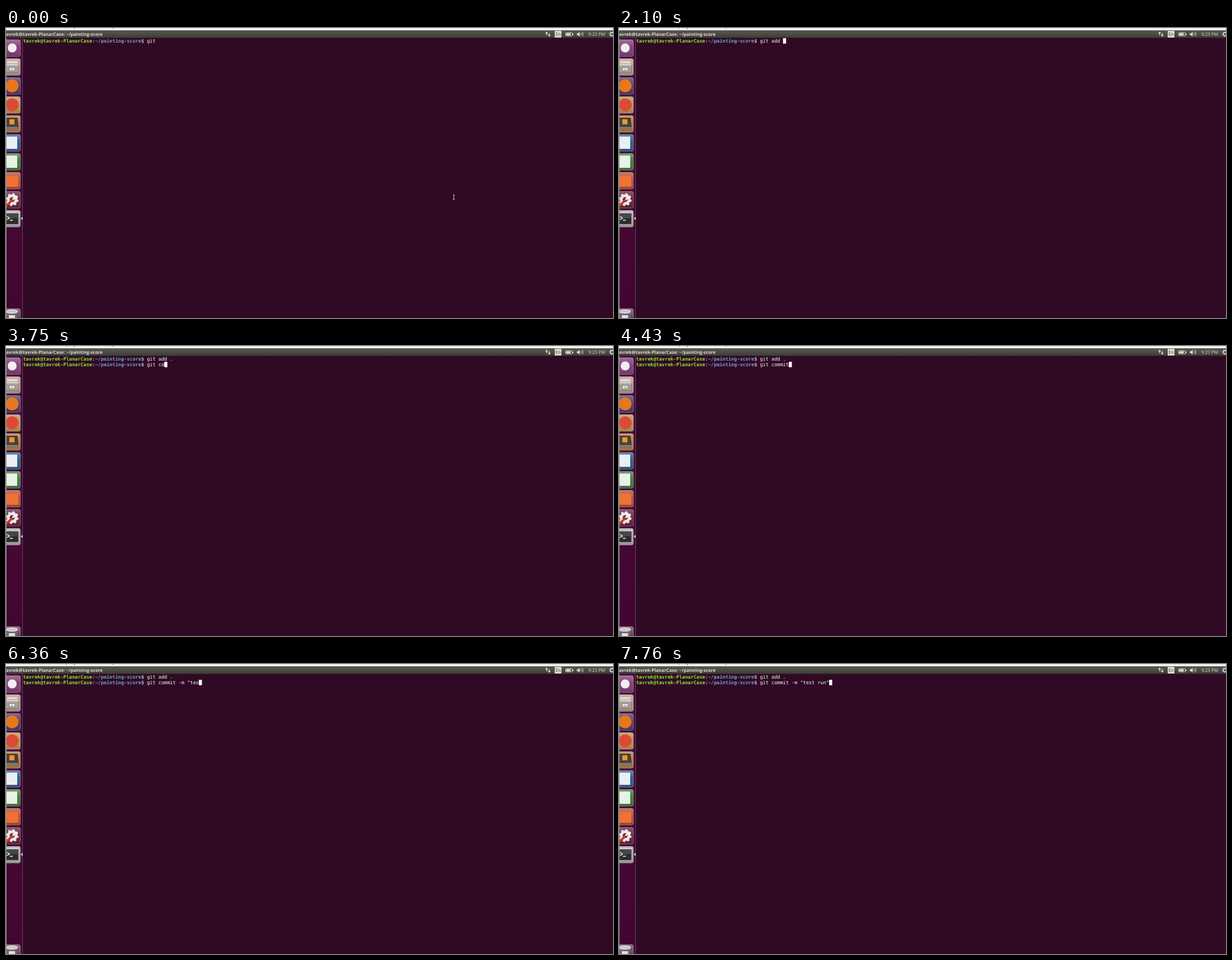
An HTML page that plays this animation: 1083x517 px, repeating every 8000 ms.

```html
<!DOCTYPE html>
<html lang="en">
<head>
<meta charset="utf-8">
<title>Terminal session</title>
<style>
  html, body { margin: 0; width: 100%; height: 100%; overflow: hidden; background: #300a24; }
  svg { display: block; width: 100%; height: 100%; }
  text { white-space: pre; text-rendering: geometricPrecision; }
  .mono { font: 8.54px "DejaVu Sans Mono", monospace; fill: #fff; }
  .panel { font: 8px "Open Sans", "Noto Sans", sans-serif; fill: #dfdbd2; }
  .bold { font-weight: 700; }
</style>
</head>
<body>
<svg id="stage" viewBox="0 0 1083 517" preserveAspectRatio="none">
  <defs>
    <linearGradient id="bar" x2="0" y2="1">
      <stop stop-color="#5b5a51"/><stop offset="1" stop-color="#3d3c37"/>
    </linearGradient>
    <linearGradient id="dock" x2="0" y2="1">
      <stop stop-color="#4a0c3c"/><stop offset="1" stop-color="#41062f"/>
    </linearGradient>
    <linearGradient id="gloss" x2="0" y2="1">
      <stop stop-color="#fff" stop-opacity=".26"/>
      <stop offset=".5" stop-color="#fff" stop-opacity=".02"/>
      <stop offset="1" stop-color="#000" stop-opacity=".16"/>
    </linearGradient>
  </defs>
  <rect width="1083" height="517" fill="#300a24"/>

  <g id="launcher">
    <rect y="17" width="29" height="500" fill="url(#dock)"/>
    <rect x="29" y="17" width="1" height="500" fill="#674060"/>
    <g id="tiles"></g>
    <path d="M29.5 336.5v6l-3-3z" fill="#eee"/>
    <rect y="18" width="1" height="499" fill="#a08a9b"/>
  </g>

  <g id="panel">
    <rect width="1083" height="4" fill="#fff"/>
    <rect width="1083" height="1" fill="#dcdcdc"/>
    <path d="M107 .5h1M121 .5h2M190 .5h1.500" stroke="#444"/>
    <rect y="4" width="1083" height="13.500" fill="url(#bar)"/>
    <text id="title" class="panel bold" x="0" y="13.500"></text>
    <path d="M964.600 13V8M969.300 9v5" stroke="#dfdbd2" stroke-width="1.300"/>
    <path d="M962 9.800l2.600-3.600 2.600 3.600zM966.700 12.200l2.600 3.600 2.600-3.600z" fill="#dfdbd2"/>
    <rect x="979" y="5" width="12" height="12" rx="1" fill="#dfdbd2"/>
    <text class="panel" x="980.500" y="13.800" style="fill:#3c3b37">En</text>
    <rect x="998.500" y="8.500" width="12" height="5.500" rx="1" fill="none" stroke="#dfdbd2"/>
    <path d="M999.500 9.500h8v3.500h-8zM1011 10h1.500v2.500h-1.500z" fill="#dfdbd2"/>
    <path d="M1018.500 9.500h2l3-2.700v8.600l-3-2.700h-2z" fill="#dfdbd2"/>
    <path d="M1025 9.500q1.200 1.500 0 3M1026.700 8q2.300 3 0 6M1028.300 6.700q3.200 4.300 0 8.600"
      fill="none" stroke="#dfdbd2" stroke-width=".8"/>
    <text class="panel" x="1039" y="13.500">9:23 PM</text>
    <circle cx="1081" cy="11" r="2.700" fill="none" stroke="#dfdbd2" stroke-width="1.400"/>
    <circle cx="1081" cy="11" r="4" fill="none" stroke="#dfdbd2" stroke-width="1.400" stroke-dasharray="1.57"/>
  </g>

  <g id="rows"></g>
  <rect id="caret" width="5.500" height="9.600" fill="#fff"/>
  <path id="pointer" d="M797.500 297.500h3M799 297.500v8M797.500 305.500h3" fill="none" stroke="#d8d0d5"/>
</svg>
<script>
const LOOP = 8000, LEFT = 30.4, CELL = 5.1415, ROW = 10;
const USER = 'tavrek', HOST = USER + '-PlanarCase', FOLDER = '~/painting-score';
const PROMPT_COLS = `${USER}@${HOST}:${FOLDER}$ `.length;

const byId = id => document.getElementById(id);
function add(parent, tag, attrs, content = '') {
  const node = document.createElementNS('http://www.w3.org/2000/svg', tag);
  for (const key in attrs) node.setAttribute(key, attrs[key]);
  node.textContent = content;
  parent.appendChild(node);
  return node;
}

// Launcher
const tiles = byId('tiles');
function tile(y, fill, paint) {
  const g = add(tiles, 'g', { transform: `translate(0 ${y})` });
  const box = { x: -4, y: .5, width: 29.5, height: 29.5, rx: 3 };
  add(g, 'rect', { ...box, fill });
  add(g, 'rect', { ...box, fill: 'url(#gloss)', stroke: '#fff', 'stroke-opacity': .35 });
  paint(g);
}
const path = (g, d, fill, stroke = 'none', width = 1) =>
  add(g, 'path', { d, fill, stroke, 'stroke-width': width });
const disc = (r, fill, x = 11) => g => add(g, 'circle', { cx: x, cy: 15, r, fill });
const block = (x, y, width, height, fill) => g => add(g, 'rect', { x, y, width, height, fill });

function drawer(g) {
  path(g, 'M2 5H20L22 13H0z', '#e2ded9');
  path(g, 'M1 9H21', 'none', '#c98a6a');
  path(g, 'M0 12H22V25H0z', '#a5a19c', '#77736e');
  path(g, 'M0 12.500H22', 'none', '#d8d5d1');
  path(g, 'M6 16H16V22H6z', '#efefec', '#77736e');
  path(g, 'M9 19.500H13', 'none', '#666');
}
function editor(g) {
  path(g, 'M0 5H20L22 24H0z', '#46433e', '#25231f');
  path(g, 'M0 21H22V24H0z', '#8b8680');
  block(6, 7, 9, 9, '#f0962e')(g);
}
function gear(g) {
  add(g, 'circle', { cx: 11, cy: 15, r: 9.5, fill: 'none', stroke: '#e8e8e8', 'stroke-width': 4, 'stroke-dasharray': '3.73' });
  add(g, 'circle', { cx: 11, cy: 15, r: 7, fill: 'none', stroke: '#e8e8e8', 'stroke-width': 5 });
  path(g, 'M1 26L13 14', 'none', '#cf3a22', 4);
  path(g, 'M12 15L17 10M15 6V11H21', 'none', '#f4f4f4', 3);
}
function shell(g) {
  path(g, 'M0 4H23V26H0z', '#dededd');
  path(g, 'M0 6H22V25H0z', '#2b2d2c', '#555');
  path(g, 'M0 6.500H21.500V14Q10 14 0 18z', '#464847');
  path(g, 'M2 11L6 14L2 17M7 18H12', 'none', '#fff', 1.4);
}
function bin(g) {
  path(g, 'M0 6H20L18 30H2z', '#74666f');
  path(g, 'M5 12H16V18H5z', '#e2dee1');
  add(g, 'ellipse', { cx: 10, cy: 5.5, rx: 10.5, ry: 2.8, fill: '#c9c4c8', stroke: '#efecee', 'stroke-width': 1.2 });
}

[
  ['#7c3d72', disc(8, '#f3edf2')],
  ['#b59a8c', drawer],
  ['#493a63', disc(11.5, '#e8771d')],
  ['#b99350', disc(11.5, '#db4a37')],
  ['#b17c3c', editor],
  ['#275b86', block(1, 4, 19, 22, '#e8f0f5')],
  ['#397b35', block(1, 4, 19, 22, '#e8f2e6')],
  ['#a84e2d', block(1, 6, 21, 20, '#ef7135')],
  ['#642139', gear],
  ['#aaa9a8', shell]
].forEach(([fill, paint], i) => tile(20.5 + i * 33.8, fill, paint));
tile(500, '#61425c', bin);

// Terminal rows
byId('title').textContent = `${USER.slice(1)}@${HOST}: ${FOLDER}`;
function makeRow(index) {
  const g = add(byId('rows'), 'g', {});
  let col = 0;
  const put = (content, style = '', fill = '#fff') => {
    const node = add(g, 'text', { class: 'mono ' + style, x: LEFT + col * CELL, y: 26 + index * ROW, style: `fill:${fill}` }, content);
    col += content.length;
    return node;
  };
  put(`${USER}@${HOST}`, 'bold', '#8ae234');
  put(':');
  put(FOLDER, 'bold', '#729fcf');
  put('$ ');
  return { g, input: put('') };
}
const rows = [makeRow(0), makeRow(1)];

// Each key: [time it appears, text added]
const FIRST = [[0, 'git '], [1360, 'a'], [1630, 'd'], [1790, 'd'], [2100, ' '], [2400, '.']];
const SECOND = [
  [3070, 'g'], [3200, 'i'], [3350, 't '], [3750, 'co'], [4020, 'm'], [4140, 'm'],
  [4430, 'it'], [4570, ' '], [4850, '-'], [4970, 'm'], [5090, ' '], [5520, '"'],
  [6080, 't'], [6210, 'e'], [6360, 's'], [6660, 't'], [6820, ' '], [7210, 'r'],
  [7360, 'u'], [7490, 'n'], [7760, '"']
];
const ENTER = 2520, PROMPT = 2670;
const typed = (keys, t) => keys.filter(([at]) => at <= t).map(([, s]) => s).join('');
const show = (node, on) => node.setAttribute('visibility', on ? 'visible' : 'hidden');

function draw(t) {
  const lines = [typed(FIRST, t), typed(SECOND, t)];
  lines.forEach((line, i) => { rows[i].input.textContent = line; });
  show(rows[1].g, t >= PROMPT);

  const row = t >= ENTER ? 1 : 0;
  const col = t >= ENTER && t < PROMPT ? 0 : PROMPT_COLS + lines[row].length;
  const caret = byId('caret');
  caret.setAttribute('x', LEFT + col * CELL);
  caret.setAttribute('y', 18.2 + row * ROW);
  show(caret, t >= 1230 || (t >= 400 && t < 980));
  show(byId('pointer'), t < 120);
}

function tick() {
  draw(performance.now() % LOOP);
  requestAnimationFrame(tick);
}
tick();
</script>
</body>
</html>
```
